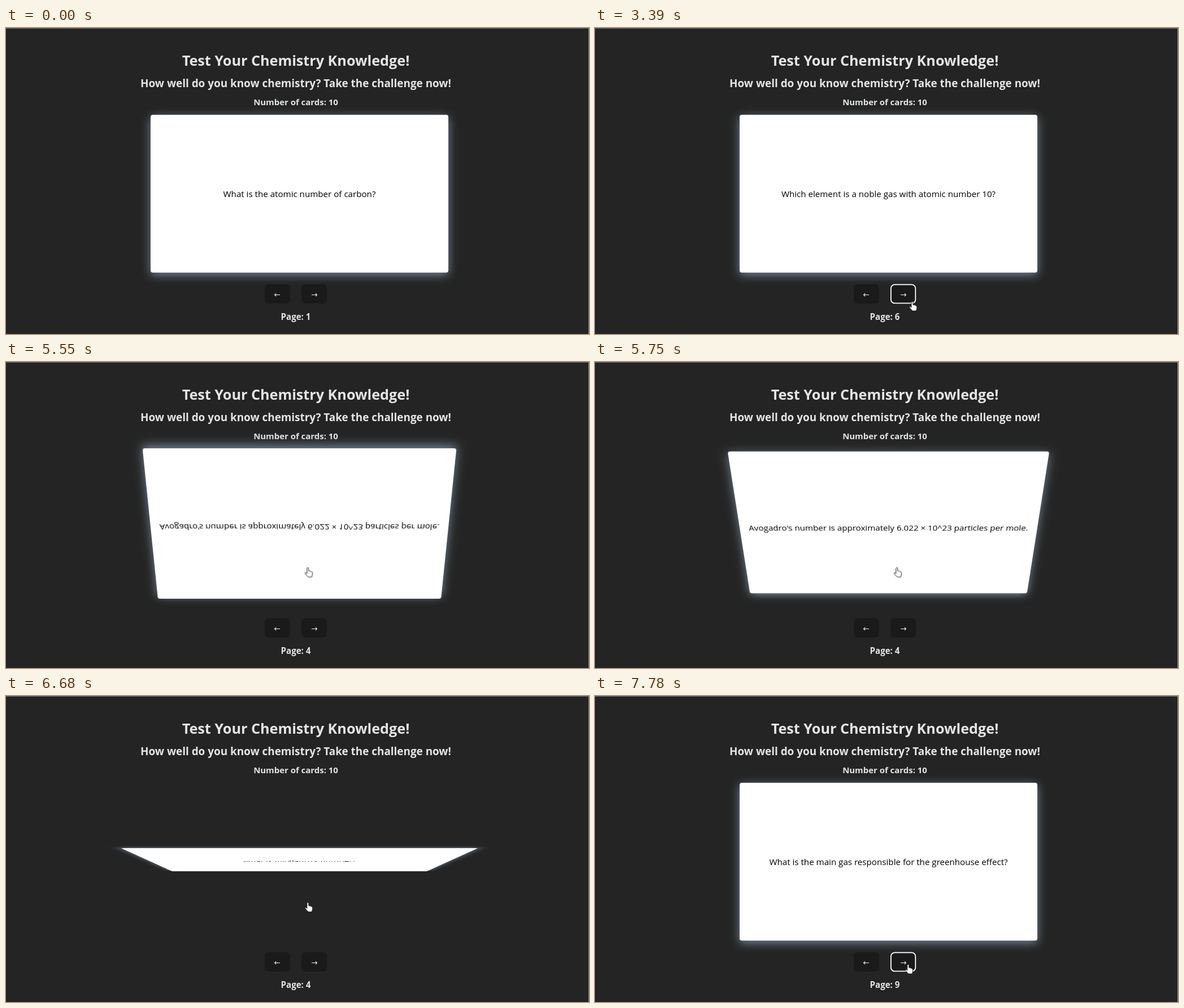
An HTML page that plays this animation: 1032 px wide and 543 px high, repeating every 8 s.

```html
<!DOCTYPE html>
<html lang="en">
<head>
<meta charset="utf-8">
<title>Chemistry flashcards</title>
<style>
  html, body { margin: 0; width: 100%; height: 100%; overflow: hidden; background: #242424; }
  .stage { position: relative; width: 1032px; height: 543px; overflow: hidden; }
  .layer { position: absolute; left: 0; top: 0; width: 1032px; height: 543px; }
  text { font-family: "Open Sans", "Noto Sans", sans-serif; text-anchor: middle; }
  .label { font-weight: 700; fill: #e5e5e5; }
  .arrow { fill: none; stroke: #f0f0f0; stroke-width: 1.1; }
  .scene { position: absolute; left: 256px; top: 154px; width: 527px; height: 279.5px; perspective: 840px; }
  .card {
    width: 100%; height: 100%; border-radius: 4px; background: #fff;
    box-shadow: 0 4px 17px lightslategray;
    animation: flip 8s ease infinite;
  }
  .card svg { display: block; width: 100%; height: 100%; overflow: visible; }
  .card text { font-size: 15.15px; fill: #000; }
  .hover { fill: none; stroke: #646cff; animation: hover 8s linear infinite; }
  .ring { fill: none; stroke: #fff; stroke-width: 1.8; animation: ring 8s step-end infinite; }
  .cursor { animation: move 8s linear infinite; }
  .cursor path { fill: #fff; stroke: #111; stroke-width: .9; stroke-linejoin: round; }
  .pointer { animation: pointer 8s step-end infinite; }
  .hand { animation: hand 8s step-end infinite; }

  @keyframes flip {
    0%, 67.706% { transform: rotateX(0deg); }
    73.956%, 81.0745% { transform: rotateX(360deg); }
    86.6995%, 100% { transform: rotateX(0deg); }
  }
  @keyframes hover {
    0%, 14.6% { opacity: 0; }
    16.6%, 63.9% { opacity: 1; }
    66.5%, 88.3% { opacity: 0; }
    91%, 100% { opacity: 1; }
  }
  @keyframes ring {
    0% { opacity: 0; }
    30.5% { opacity: 1; }
    67.5% { opacity: 0; }
    91.25%, 100% { opacity: 1; }
  }
  @keyframes move {
    0%, 4.49% { transform: translate(900px, 570px); }
    4.5% { transform: translate(857px, 533px); animation-timing-function: ease-out; }
    7.25%, 11.25% { transform: translate(670px, 499px); animation-timing-function: ease-in-out; }
    14.6% { transform: translate(567px, 488px); }
    16.6%, 63.375% { transform: translate(561.5px, 485px); animation-timing-function: ease-in-out; }
    67%, 79.375% { transform: translate(534.3px, 364.5px); }
    80.5%, 86.3% { transform: translate(534.3px, 366px); animation-timing-function: ease-in-out; }
    88.5%, 89.625% { transform: translate(552px, 480px); }
    93%, 100% { transform: translate(554.3px, 476px); }
  }
  @keyframes pointer { 0% { opacity: 1; } 14.6%, 100% { opacity: 0; } }
  @keyframes hand { 0% { opacity: 0; } 14.6%, 100% { opacity: 1; } }
</style>
</head>
<body>
<div class="stage">
  <svg class="layer" viewBox="0 0 1032 543">
    <rect width="1032" height="1" fill="#747474"/>
    <rect x="1031" width="1" height="543" fill="#8a8a8a"/>
    <g class="label">
      <text x="513" y="67" font-size="25.2">Test Your Chemistry Knowledge!</text>
      <text x="513" y="105" font-size="18.9">How well do you know chemistry? Take the challenge now!</text>
      <text x="513" y="137" font-size="14.95">Number of cards: 10</text>
      <text x="513" y="518.4" font-size="15.1" id="page">Page: 1</text>
    </g>
    <g fill="#1a1a1a">
      <rect x="458" y="454.5" width="45" height="34.5" rx="7"/>
      <rect x="523" y="454.5" width="45" height="34.5" rx="7"/>
    </g>
    <path class="arrow" d="M485 473.5H475.6M478.2 470.8L475.5 473.5L478.2 476.2"/>
    <path class="arrow" d="M541 473.5H550.4M547.8 470.8L550.5 473.5L547.8 476.2"/>
    <rect class="hover" x="523.5" y="455" width="44" height="33.5" rx="6.5"/>
    <rect class="ring" x="523.9" y="455.4" width="43.4" height="33" rx="6.5"/>
  </svg>

  <div class="scene">
    <div class="card" id="card">
      <svg><text x="263.5" y="146" id="words">What is the atomic number of carbon?</text></svg>
    </div>
  </div>

  <svg class="layer" viewBox="0 0 1032 543">
    <g class="cursor">
      <path class="pointer" d="M0 0V13.5L3.2 10.6L5.2 15.2L7.3 14.3L5.3 9.8H9.6Z"/>
      <path class="hand" d="M-1.5 1.8Q-1.4 .4 0 .4T1.5 1.8V6.2Q3.6 5.6 4 6.9Q5.8 6.4 6.3 7.7Q8.1 7.5 8.2 9.2V12Q8 14.6 6.9 17H.5Q-2.2 14.2-4.8 10.8Q-5.3 9.2-3.7 9.1L-1.5 10.8Z"/>
    </g>
  </svg>
</div>
<script>
  const questions = {
    1: "What is the atomic number of carbon?",
    3: "What is the chemical formula for water?",
    4: "What is Avogadro's number?",
    5: "What is the pH of a neutral solution?",
    6: "Which element is a noble gas with atomic number 10?",
    7: "What is the chemical symbol for potassium?",
    8: "What is the most abundant element in the Earth's atmosphere?",
    9: "What is the main gas responsible for the greenhouse effect?"
  };
  const answer = "Avogadro's number is approximately 6.022 × 10^23 particles per mole.";

  // [start in ms, page]
  const visits = [[0, 1], [2440, 9], [2920, 3], [3340, 6], [3750, 8], [4060, 5],
                  [4500, 6], [4820, 4], [7300, 7], [7700, 9]];
  // The words change on the click, just before the card turns.
  const answerFrom = 5400, answerTo = 6440;

  const page = document.getElementById("page");
  const words = document.getElementById("words");
  const clock = document.getElementById("card").getAnimations()[0];

  function setText(el, text) {
    if (el.textContent !== text) el.textContent = text;
  }

  function draw() {
    const t = (clock ? clock.currentTime || 0 : performance.now()) % 8000;
    const n = visits.filter(v => v[0] <= t).pop()[1];
    setText(page, "Page: " + n);
    setText(words, t >= answerFrom && t < answerTo ? answer : questions[n]);
    requestAnimationFrame(draw);
  }
  draw();
</script>
</body>
</html>
```
